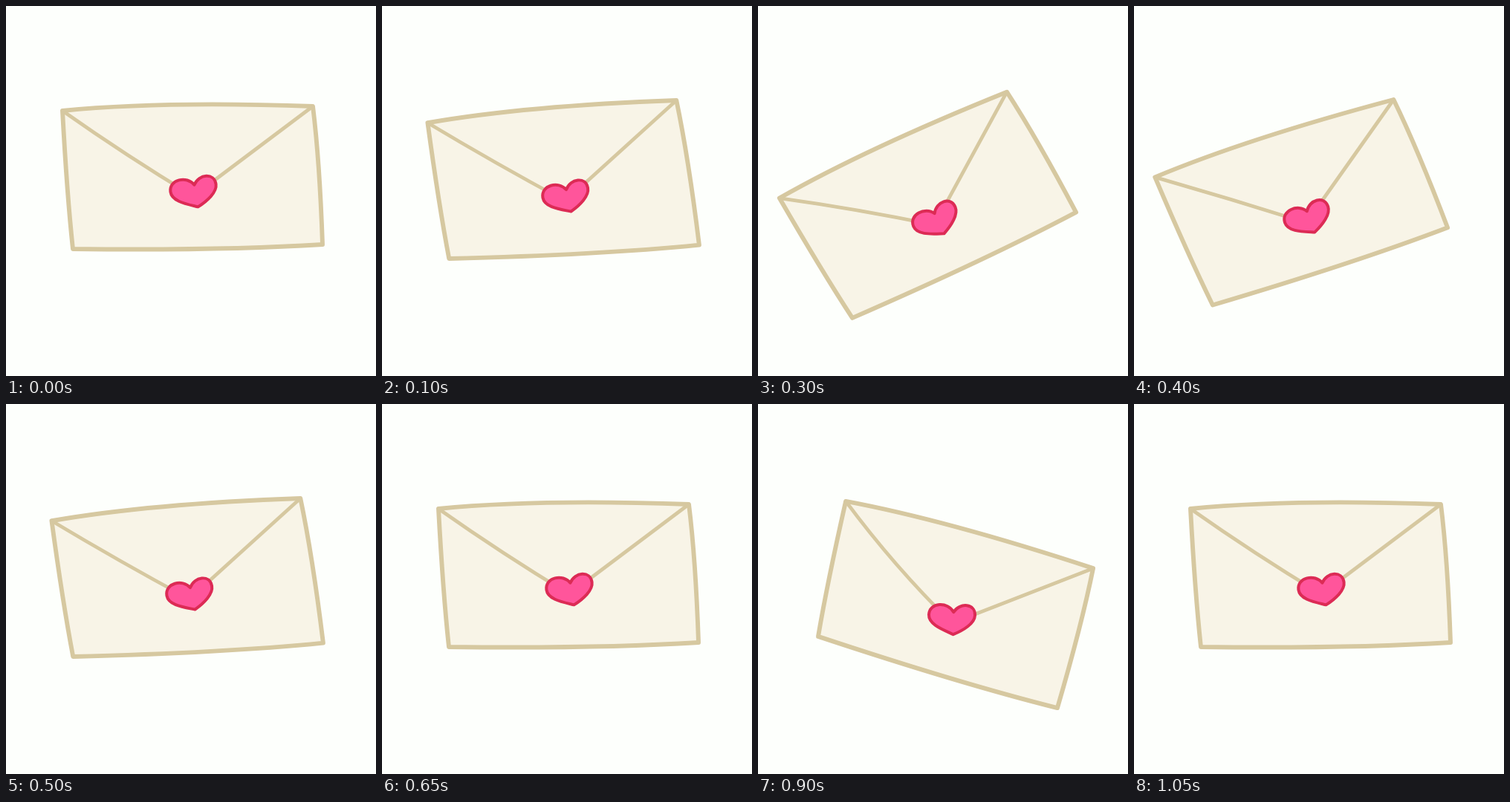
These frames come from a looping animation (498 by 498 pixels, 1100 ms). An HTML page:

```html
<!DOCTYPE html>
<html lang="en">
<head>
<meta charset="utf-8">
<title>Swinging envelope</title>
<style>
  html, body { margin: 0; width: 100%; height: 100%; overflow: hidden; background: #fdfffc; }
  svg { display: block; width: 100vw; height: 100vh; }
  path { stroke-linejoin: round; stroke-linecap: round; }
  #paper { fill: #f8f4e7; stroke: #d6c8a0; stroke-width: 5.9; }
  #flap { fill: none; stroke: #d6c8a0; stroke-width: 4.8; }
  #heart { fill: #ff559b; stroke: #dc2b55; stroke-width: 4; }
</style>
</head>
<body>
<svg viewBox="0 0 498 498">
  <path id="paper"/>
  <path id="flap"/>
  <path id="heart" d="M2-4C-6-18-31-16-31 1C-31 14-12 20 3 26C16 20 31 10 31-1C31-17 10-18 2-4Z"/>
</svg>
<script>
const STEP = 50, STEPS = 22;
const EDGE_BOWS = [5.5, 2, 3, 1.2];   // top, right, bottom, left
const BOW_AT = 0.4;                   // where along an edge it bulges

// Key poses from left to right tilt: TL, TR, BR, BL and the heart's place.
const poses = [
  [[28, 231], [349, 126], [422, 298], [106, 403], [232, 281]],
  [[62, 156], [397, 127], [427, 322], [90, 339], [247, 251]],
  [[76, 141], [413, 135], [426, 321], [90, 327], [252, 245]],
  [[106, 127], [439, 173], [425, 397], [87, 335], [261, 266]],
  [[118, 131], [451, 221], [403, 409], [81, 313], [261, 284]]
];

const rad = deg => deg * Math.PI / 180;
const tilt = ([a, b]) => Math.atan2(b[1] - a[1], b[0] - a[0]) / rad(1);
const mix = (a, b, t) => a.map((v, i) => v + (b[i] - v) * t);

const tilts = poses.map(tilt);
const rest = tilts[2];

// Smooth rise and fall around a middle step.
const hump = (step, mid, half) => {
  const d = (step - mid) / half;
  return Math.abs(d) < 1 ? Math.cos(d * Math.PI / 2) ** 2 : 0;
};

// One wide swing to the left, then a quicker one to the right.
const angleAt = step => rest - 24 * hump(step, 6, 5.5) + 19.3 * hump(step, 17, 3.8);

// Turns a pose about its middle, sinking a little as it goes.
function turn(pose, deg) {
  const [cx, cy] = mix(mix(pose[0], pose[2], 0.5), mix(pose[1], pose[3], 0.5), 0.5);
  const c = Math.cos(rad(deg)), s = Math.sin(rad(deg)), slide = Math.abs(deg) / 2;
  return pose.map(([x, y]) => [
    cx + slide + (x - cx) * c - (y - cy) * s,
    cy + slide + (x - cx) * s + (y - cy) * c
  ]);
}

// Blends the two poses around an angle, or turns the outermost one further.
function poseAt(angle) {
  const last = poses.length - 1;
  if (angle < tilts[0]) return turn(poses[0], angle - tilts[0]);
  if (angle >= tilts[last]) return turn(poses[last], angle - tilts[last]);
  const i = tilts.findIndex(v => v > angle) - 1;
  const t = (angle - tilts[i]) / (tilts[i + 1] - tilts[i]);
  return poses[i].map((p, k) => mix(p, poses[i + 1][k], t));
}

const xy = p => p.map(v => v.toFixed(2)).join(" ");

// Curve from a to b, pushed outward by h.
function bowed(a, b, h, at = 0.5) {
  const dx = b[0] - a[0], dy = b[1] - a[1], k = 2 * h / Math.hypot(dx, dy);
  const [x, y] = mix(a, b, at);
  return `Q${xy([x + dy * k, y - dx * k])} ${xy(b)}`;
}

const set = (id, name, value) => document.getElementById(id).setAttribute(name, value);

function draw(step) {
  const angle = angleAt(step);
  const pose = poseAt(angle), [left, right] = pose, seat = pose[4];
  const under = [seat[0], seat[1] + 11];
  const edges = EDGE_BOWS.map((h, i) => bowed(pose[i], pose[(i + 1) % 4], h, BOW_AT));
  set("paper", "d", `M${xy(left)}${edges.join("")}Z`);
  set("flap", "d", `M${xy(left)}${bowed(left, under, -2 - 0.15 * angle)}` +
    `M${xy(right)}L${xy(under)}`);
  set("heart", "transform", `translate(${xy(seat)}) rotate(${0.65 * angle - 7})`);
}

const start = performance.now();
let shown = -1;
function tick() {
  const step = Math.floor((performance.now() - start) / STEP) % STEPS;
  if (step !== shown) draw(shown = step);
  requestAnimationFrame(tick);
}
tick();
</script>
</body>
</html>
```
